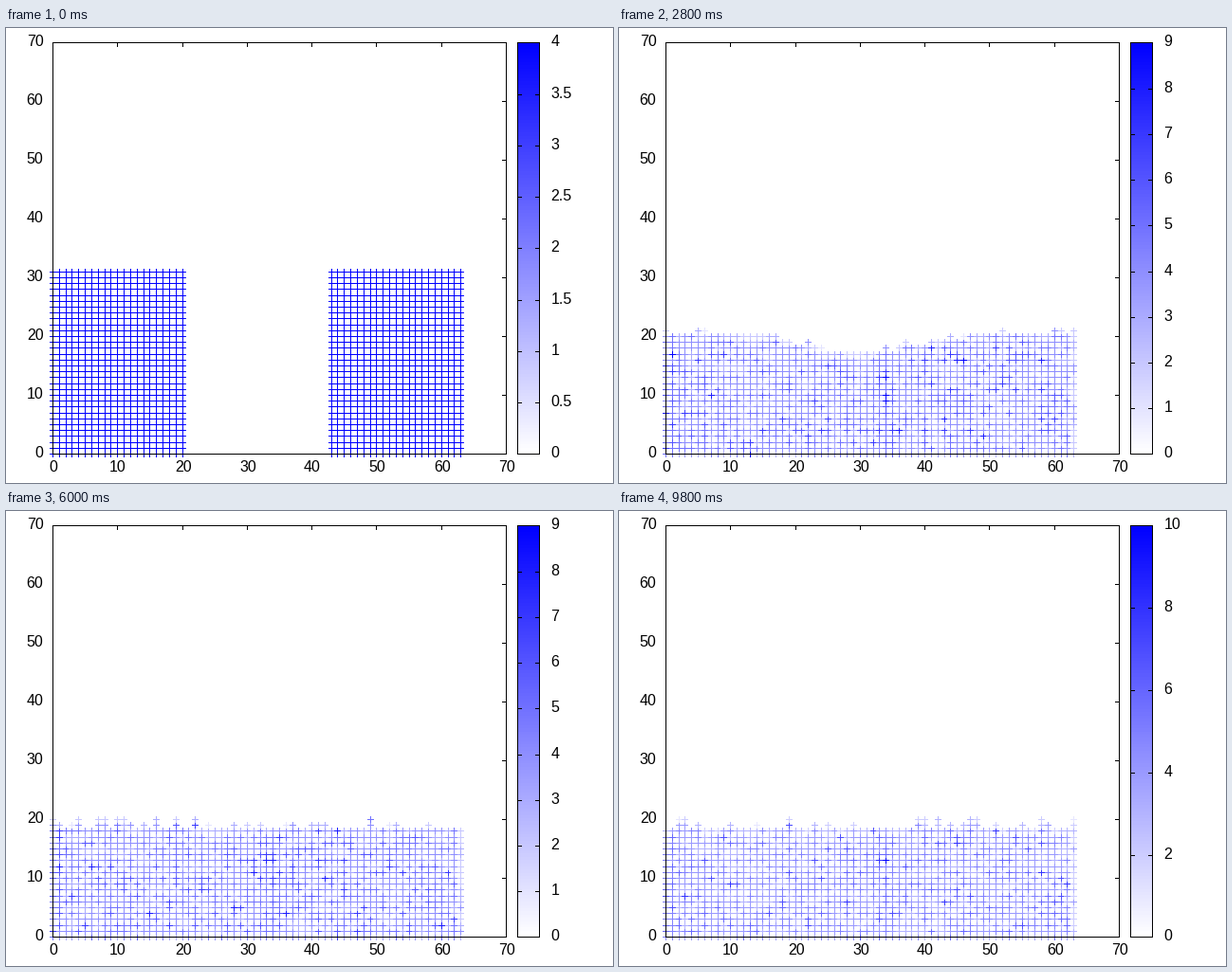
Animation, 640 px wide and 480 px high, one loop 9.9 s. Source, as a matplotlib script:

```python
import math

import numpy as np
import matplotlib.pyplot as plt
from matplotlib.animation import FuncAnimation

W, H = 640, 480
DPI = 100
FRAMES, INTERVAL = 99, 100
LEFT, RIGHT, TOP, BOTTOM = 49, 527, 15, 449
BAR_L, BAR_R = 539, 562
COLS, ROWS = 64, 32
MEET, CALM = 8, 20  # the two fronts meet, then the basin has formed
BLACK = (0, 0, 0)

rng = np.random.default_rng(7)
still = rng.normal(size=(COLS, ROWS))
phase = rng.uniform(0, 2 * np.pi, (COLS, ROWS))
speed = rng.uniform(0.03, 0.3, (COLS, ROWS))
col_phase = rng.uniform(0, 2 * np.pi, COLS)
col_speed = rng.uniform(0.15, 0.8, COLS)

xs = np.arange(COLS)
ys = np.arange(ROWS)


def scale_max(n):
    if n <= MEET:
        return round(4 + 6 * (n / MEET) ** 0.6)
    return 10 if n % 12 >= 8 or n >= 90 else 9


def slump(n):
    """Two blocks sink while their feet run towards the middle."""
    t = min(n / MEET, 1)
    settled = np.where(xs < 32, 26.4 - 0.1 * xs, 24.4 + 0.09 * (xs - 43))
    top = 31 + (settled - 31) * t ** 1.7
    from_block = np.minimum(xs - 20.7, 42.5 - xs)
    u = 1 - from_block / (11.5 * t ** 1.5 + 1e-6)
    wall = 31 - 6.8 * t ** 1.7
    foot = wall * (0.65 * u + 0.35 * np.clip(u, 0, 1) ** 6)
    return np.where(from_block < 0, top, np.where(u > 0, foot, -1))


def basin(n):
    """A dip in the middle that levels out."""
    age = n - CALM
    level = 18.95 + 3.4 * math.exp(-age / 19)
    depth = 7 * math.exp(-age / 12)
    return level - depth * np.exp(-((xs - 30) / 13) ** 2)


def surface(n):
    mix = min(max((n - MEET) / (CALM - MEET), 0), 1)
    h = (1 - mix) * slump(n) + mix * basin(n)
    rough = 1 - math.exp(-n / 40)
    wave = np.clip(np.sin(col_phase + col_speed * n), 0, 1)
    return h + rough * (2 * wave ** 2 - 0.5)


def counts(n):
    """Particles in every cell; zero means empty."""
    h = surface(n)[:, None]
    x, y = xs[:, None], ys[None, :]
    mix = min(1, n / 6)
    z = 0.7 * still + 0.8 * np.sin(phase + speed * n)
    c = 4 + mix * (0.1 + z + 0.3 * z ** 2 + 1.1 * (x <= 1))
    pile = min(max((n - MEET) / 8, 0), 1)
    c += pile * 1.2 * np.exp(-((x - 34) / 1.5) ** 2)
    fade = np.clip((h - y + 0.5) / 1.5, 0.2, 1)
    c *= 1 - mix * (1 - fade)
    c[-1] *= 1 - 0.4 * mix
    c = np.clip(np.rint(c), 1, scale_max(n))
    return np.where(y <= h, c, 0)


def to_px(x, y):
    return (round(LEFT + x * (RIGHT - LEFT) / 70),
            round(BOTTOM - y * (BOTTOM - TOP) / 70))


def shade(v):
    k = round(255 * (1 - v))
    return k, k, 255


def box(img, x0, x1):
    img[[TOP, BOTTOM], x0:x1 + 1] = BLACK
    img[TOP:BOTTOM + 1, [x0, x1]] = BLACK


def background():
    img = np.full((H, W, 3), 255, np.uint8)
    for v in range(10, 70, 10):
        px, py = to_px(v, v)
        img[TOP:TOP + 5, px] = BLACK
        img[py, RIGHT - 4:RIGHT + 1] = BLACK
    for py in range(TOP, BOTTOM + 1):
        level = (BOTTOM - py) / (BOTTOM - TOP)
        img[py, BAR_L:BAR_R + 1] = shade(min(int(level * 128), 127) / 127)
    box(img, BAR_L, BAR_R)
    return img


def label(x, y, text, ha):
    return fig.text(x / W, 1 - y / H, text, ha=ha, va="baseline",
                    family="Liberation Sans", size=16 * 72 / DPI, color="black")


fig = plt.figure(figsize=(W / DPI, H / DPI), dpi=DPI, facecolor="white")
base = background()
canvas = fig.figimage(base, origin="upper")

for v in range(0, 80, 10):
    px, py = to_px(v, v)
    label(px + 1, BOTTOM + 19, str(v), "center")
    label(39.5, py + 4, str(v), "right")
bar_labels = [label(574.5, 0, "", "left") for _ in range(11)]


def draw_bar_ticks(img, top):
    step = 0.5 if top <= 5 else 1 if top < 10 else 2
    for i, text in enumerate(bar_labels):
        v = i * step
        if v > top:
            text.set_text("")
            continue
        py = BOTTOM - int(v / top * (BOTTOM - TOP))
        img[py, BAR_L:BAR_L + 5] = img[py, BAR_R - 4:BAR_R + 1] = BLACK
        text.set_text(f"{v:g}")
        text.set_y(1 - (py + 4) / H)


def draw(n):
    img = base.copy()
    top = scale_max(n)
    grid = counts(n)
    for x, y in zip(*np.nonzero(grid)):
        px, py = to_px(x, y)
        color = shade(grid[x, y] / top)
        img[py, px - 3:px + 4] = color
        img[py - 3:py + 4, px] = color
    box(img, LEFT, RIGHT)
    draw_bar_ticks(img, top)
    canvas.set_data(img)
    return [canvas, *bar_labels]


anim = FuncAnimation(fig, draw, frames=FRAMES, interval=INTERVAL,
                     repeat=True, repeat_delay=0, blit=False)
plt.show()
```
